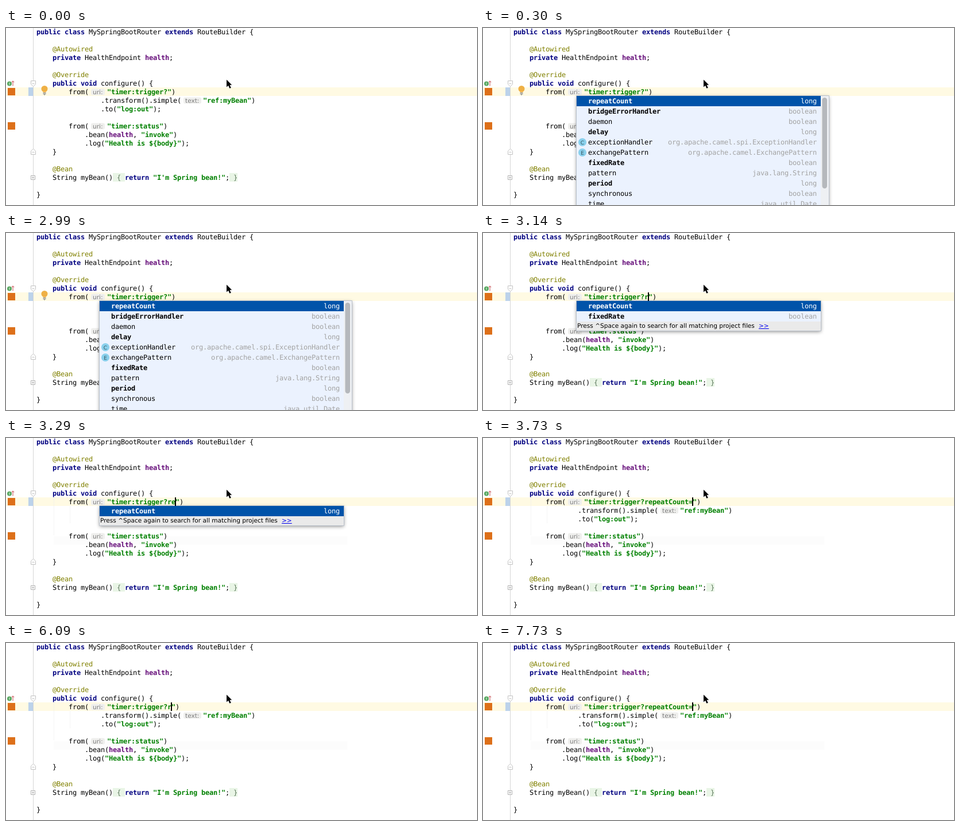
Animation of 820 by 310 pixels, one loop 8000 ms. Source, as an HTML page:

```html
<!DOCTYPE html>
<html lang="en">
<head>
<meta charset="utf-8">
<title>Code completion</title>
<style>
  html, body { margin: 0; width: 100%; height: 100%; overflow: hidden; background: #fff; }
  svg { display: block; width: 820px; height: 310px; }
  text { white-space: pre; text-rendering: geometricPrecision; }
  .code { font: 12px "DejaVu Sans Mono", monospace; letter-spacing: -.2246px; }
  .ui { font: 10.57px "DejaVu Sans", sans-serif; }
  .bold, .key, .str, .field { font-weight: bold; }
  .key { fill: #000080; }
  .str { fill: #008000; }
  .field { fill: #660e7a; }
  .note { fill: #808000; }
  .fold { fill: #5f7a5f; }
  .hint { fill: #7d7d7d; }
  .type { fill: #a3a3a3; }
  .white { fill: #fff; }
  .popup { filter: drop-shadow(0 2px 3px rgba(0, 0, 0, .45)); }
</style>
</head>
<body>
<svg id="stage" viewBox="0 0 820 310"></svg>
<script>
const LOOP = 8000, CHAR = 7, LINE = 15, ROW = 18;
const WORD = "repeatCount=", START = 281;
const stage = document.getElementById("stage");

const esc = s => s.replace(/&/g, "&amp;").replace(/</g, "&lt;").replace(/>/g, "&gt;");
const rect = (x, y, w, h, fill, more = "") =>
  `<rect x="${x}" y="${y}" width="${w}" height="${h}" fill="${fill}" ${more}/>`;
const path = (d, stroke, fill = "none", more = "") =>
  `<path d="${d}" stroke="${stroke}" fill="${fill}" ${more}/>`;
const text = (x, y, s, cls) => `<text x="${x}" y="${y}" class="${cls}">${esc(s)}</text>`;
const baseline = row => 11 + row * LINE;

// Lays out [text, class] tokens on the character grid.
function code(x, row, ...tokens) {
  let out = "";
  for (const [s, cls = ""] of tokens) {
    out += text(x, baseline(row), s, "code " + cls);
    x += s.length * CHAR;
  }
  return out;
}

function hint(x, row, s, w) {
  return rect(x - 3, row * LINE + 1.5, w, 11, "#efefed", 'rx="3"') +
    text(x, baseline(row) - .5, s, "ui hint");
}

function gutter() {
  const fold = "#c2c2c2";
  const badge = y => rect(3, y, 13, 13, "#dd701a");
  return path("M47.5 0V310", "#d6d6d6") +
    rect(39, 104, 8, 15, "#bcd2ea") +
    path("M43.5 92.5h8v6l-4 4l-4 -4zM45.5 97.5h4", fold, "#fff") +
    path("M43.5 221.5h8v-6l-4 -4l-4 4zM45.5 217.5h4", fold, "#fff") +
    path("M43.5 258.5h7v7h-7zM45 262h4M47 260v4", "#b0b0b0", "#fff") +
    `<circle cx="6" cy="97.5" r="4" fill="#58a861"/>` +
    path("M6 95.5v4", "#e9f7ea") +
    path("M12 101.5V93M9.8 95.2L12 92.7L14.2 95.2", "#c94f55") +
    badge(105) + badge(165);
}

const source =
  code(53, 0, ["public class ", "key"], ["MySpringBootRouter "], ["extends ", "key"], ["RouteBuilder {"]) +
  code(81, 2, ["@Autowired", "note"]) +
  code(81, 3, ["private ", "key"], ["HealthEndpoint "], ["health", "field"], [";"]) +
  code(81, 5, ["@Override", "note"]) +
  code(81, 6, ["public void ", "key"], ["configure() {"]) +
  code(109, 7, ["from("]) + hint(151, 7, "uri:", 24) +
  code(165, 8, [".transform().simple("]) + hint(312, 8, "text:", 31) +
  code(343, 8, ['"ref:myBean"', "str"], [")"]) +
  code(165, 9, [".to("], ['"log:out"', "str"], [");"]) +
  code(109, 11, ["from("]) + hint(151, 11, "uri:", 24) +
  code(176, 11, ['"timer:status"', "str"], [")"]) +
  code(137, 12, [".bean("], ["health", "field"], [", "], ['"invoke"', "str"], [")"]) +
  code(137, 13, [".log("], ['"Health is ${body}"', "str"], [");"]) +
  code(81, 14, ["}"]) +
  code(81, 16, ["@Bean", "note"]) +
  rect(186, 254, 21, 15, "#e9f5e6") + rect(389, 254, 14, 15, "#e9f5e6") +
  code(81, 17, ["String myBean()"], [" { ", "fold"], ["return ", "key"],
    ['"I\'m Spring bean!"', "str"], [";"], [" }", "fold"]) +
  code(53, 19, ["}"]);

const bulb =
  `<circle cx="67" cy="106.5" r="5.5" fill="#efb045"/>` +
  rect(64.5, 110, 5, 2.5, "#efb045") +
  path("M64.5 113.5h5M64.5 115.5h5M66 117h2", "#777");

const guides = rect(83, 172, 511, 15, "#fcfcfc") +
  path("M83.5 105V171M111.5 120V150", "#ebebeb", "none", 'stroke-dasharray="1 1"');

const pointer = path("M384 90.5V103.5L387 100.8L389.3 105.8L391.8 104.7L389.5 99.8H393.2Z",
  "#fff", "#000", 'paint-order="stroke"');

// Each option: name, type, bold flag, icon letter.
const options = [
  ["repeatCount", "long", 1], ["bridgeErrorHandler", "boolean", 1], ["daemon", "boolean"],
  ["delay", "long", 1],
  ["exceptionHandler", "org.apache.camel.spi.ExceptionHandler", 0, "C"],
  ["exchangePattern", "org.apache.camel.ExchangePattern", 0, "E"],
  ["fixedRate", "boolean", 1], ["pattern", "java.lang.String"], ["period", "long", 1],
  ["synchronous", "boolean"], ["time", "java.util.Date"]
];

function optionRow([name, type, bold, icon], i) {
  const y = 119 + i * ROW, base = y + 13;
  return (i ? "" : rect(163, y, 425, ROW, "#0053a9")) +
    (icon ? `<circle cx="173" cy="${y + 9}" r="7" fill="#89d0ec"/>` +
      `<text x="173" y="${y + 12.5}" class="ui" font-size="9" text-anchor="middle" fill="#33535f" style="font-size:9px">${icon}</text>` : "") +
    text(183, base, name, "code" + (bold ? " bold" : "") + (i ? "" : " white")) +
    text(581 - type.length * CHAR, base, type, "code " + (i ? "type" : "white"));
}

const popup = (w, h, body) =>
  `<g><g class="popup">${rect(163, 119, w, h, "#ebf2fe")}</g>${body}</g>`;

const fullList = popup(439, 200, options.map(optionRow).join("") +
  rect(588, 119, 14, 200, "#eef0f3") + rect(590.5, 122, 8.5, 159, "#b5b8bc", 'rx="4.2"') +
  path("M162.5 310V118.5H602.5V310", "#b9c0ca"));

function shortList(list) {
  const foot = 119 + list.length * ROW;
  return popup(425, foot + 16 - 119, list.map(optionRow).join("") +
    rect(163, foot, 425, 16, "#eaeaea") +
    text(164, foot + 11, "Press ^Space again to search for all matching project files", "ui") +
    `<text x="480" y="${foot + 11}" class="ui" fill="#0000ee" text-decoration="underline">&gt;&gt;</text>` +
    path(`M162.5 118.5h426v${foot - 102}h-426z`, "#b9c0ca"));
}

const popups = [
  [300, 3140, fullList],
  [3140, 3290, shortList([options[0], options[6]])],
  [3290, 3730, shortList([options[0]])]
];

stage.innerHTML =
  rect(0, 0, 820, 310, "#fff") + rect(0, 104, 820, 15, "#fffae3") +
  `<g id="guides">${guides}</g>` + gutter() + source +
  `<g id="bulb">${bulb}</g>` +
  `<text id="uri" class="code str" x="176" y="${baseline(7)}"></text>` +
  `<text id="close" class="code" y="${baseline(7)}">)</text>` +
  popups.map(([, , body], i) => `<g id="popup${i}">${body}</g>`).join("") +
  `<rect id="caret" y="104" width="2" height="15"/>` + pointer;

const $ = id => document.getElementById(id);
const show = (id, on) => $(id).setAttribute("display", on ? "inline" : "none");

// Number of letters of WORD typed after the question mark.
function typed(t) {
  const erased = (from, to, n) => 1 + Math.floor((t - from) / ((to - from) / (n - 1)) + 1e-6);
  if (t < 3140) return 0;
  if (t < 3290) return 1;
  if (t < 3730) return 2;
  if (t < 4630) return 12;
  if (t < 5800) return 12 - Math.min(8, erased(4630, 5650, 8));
  if (t < 6540) return 4 - Math.min(3, erased(5800, 6090, 3));
  if (t < 6840) return 0;
  if (t < 6990) return 1;
  return t < 7730 ? 2 : 12;
}

const blinks = [600, 1050, 1500, 2100, 2550, 2990, 3140];

function draw(t) {
  const n = typed(t), x = START + n * CHAR;
  $("uri").textContent = '"timer:trigger?' + WORD.slice(0, n) + '"';
  $("close").setAttribute("x", x + CHAR);
  $("caret").setAttribute("x", x - 1);
  show("caret", blinks.filter(b => b <= t).length % 2);
  show("bulb", t < 3140);
  show("guides", t >= 3290);
  popups.forEach(([from, to], i) => show("popup" + i, t >= from && t < to));
}

const begin = performance.now();
function tick() {
  draw((performance.now() - begin) % LOOP);
  requestAnimationFrame(tick);
}
tick();
</script>
</body>
</html>
```
